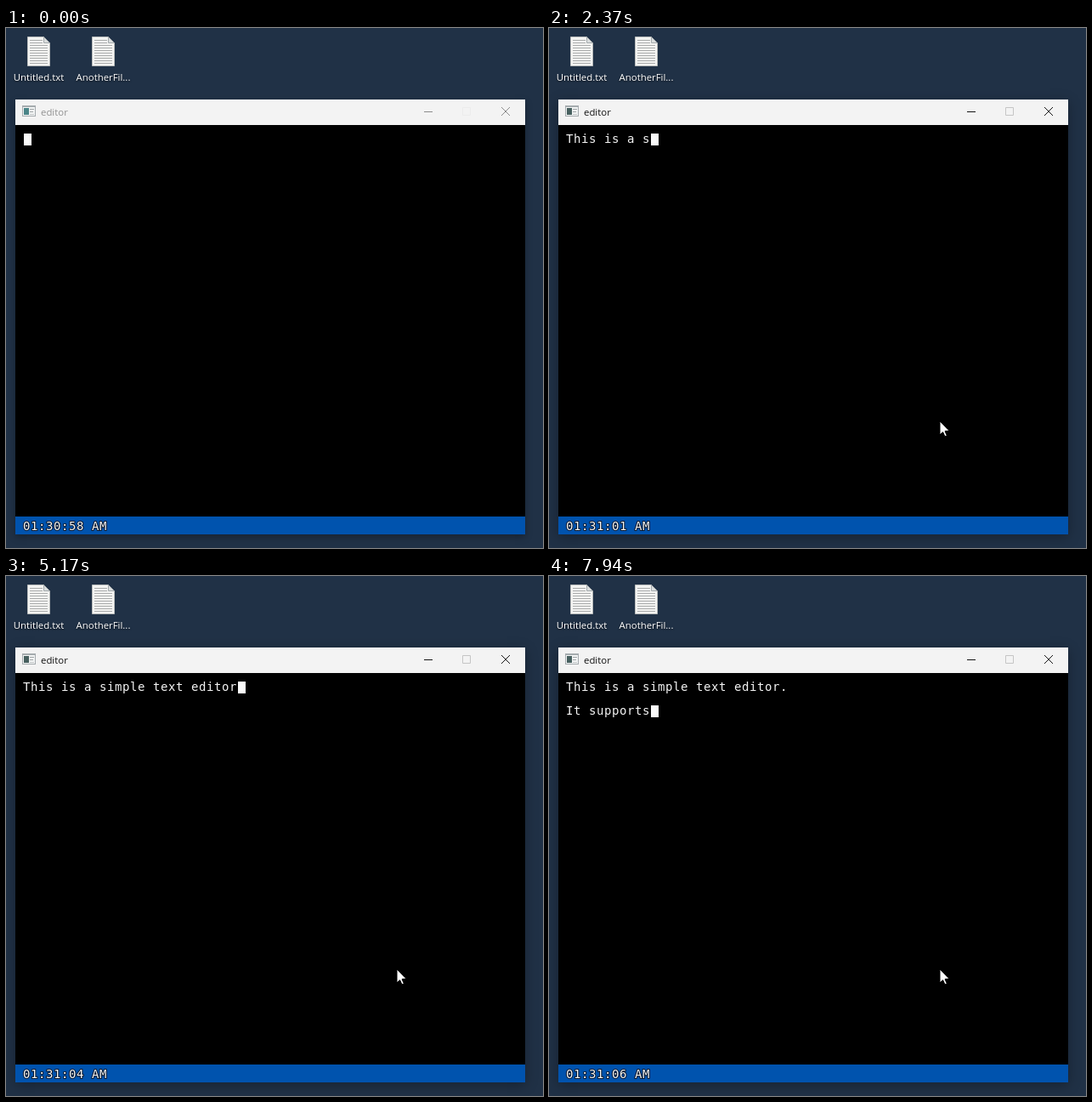
An HTML page with a canvas that plays this animation: 632x611 px, repeating every 8 s.

```html
<!DOCTYPE html>
<html lang="en">
<head>
<meta charset="utf-8">
<title>Text editor demo</title>
<style>
  html, body { margin: 0; width: 100%; height: 100%; overflow: hidden; background: #203146; }
  canvas { display: block; width: 632px; height: 611px; }
</style>
</head>
<body>
<canvas id="stage" width="632" height="611"></canvas>
<script>
const ctx = document.getElementById('stage').getContext('2d');

const LOOP = 8000;
const FOCUS_AT = 1030;
const CELL = 9, LINE = 14;
const WIN = { x: 11, y: 84, w: 600, h: 511 };
const UI_FONT = '"Open Sans", "Noto Sans", sans-serif';
const MONO_FONT = '14px "DejaVu Sans Mono", monospace';

const TEXT = 'This is a simple text editor.\n\nIt supports';
// One time per typed character, line breaks included.
const KEY_TIMES = [
  1230, 1380, 1430, 1580, 1720, 1840, 1980, 2040, 2170, 2310, 2370,
  2570, 2710, 2770, 2910, 2970, 3170, 3300,
  3430, 3560, 3760, 3900, 4100, 4230, 4290,
  4350, 4490, 4550, 5900, 6100, 6160,
  6690, 6750, 6950, 7010, 7150, 7350, 7490, 7550, 7740, 7880, 7940
];
const TICK_TIMES = [200, 1230, 2170, 3170, 4230, 5170, 6550, 7290];
const POINTER_TIMES = [70, 140, 200, 300, 370, 440];

const countPassed = (times, t) => times.filter(at => at <= t).length;

function rect(x, y, w, h, color) {
  ctx.fillStyle = color;
  ctx.fillRect(x, y, w, h);
}

function polygon(points, fill, stroke) {
  ctx.beginPath();
  points.forEach(([x, y]) => ctx.lineTo(x, y));
  ctx.closePath();
  if (fill) { ctx.fillStyle = fill; ctx.fill(); }
  if (stroke) { ctx.strokeStyle = stroke; ctx.lineWidth = 1; ctx.stroke(); }
}

function label(text, x, y, color, align = 'left') {
  ctx.font = '11.4px ' + UI_FONT;
  ctx.textAlign = align;
  ctx.fillStyle = color;
  ctx.fillText(text, x, y);
}

// Monospaced text set on the cell grid.
function cells(text, x, y, outline) {
  ctx.font = MONO_FONT;
  ctx.textAlign = 'left';
  ctx.lineJoin = 'round';
  [...text].forEach((ch, i) => {
    if (outline) {
      ctx.strokeStyle = '#06162c';
      ctx.lineWidth = 2;
      ctx.strokeText(ch, x + i * CELL, y);
    }
    ctx.fillStyle = '#f4f4f4';
    ctx.fillText(ch, x + i * CELL, y);
  });
}

function fileIcon(x, y, name) {
  polygon([[x + .5, y + .5], [x + 19.5, y + .5], [x + 26.5, y + 7.5],
    [x + 26.5, y + 34.5], [x + .5, y + 34.5]], '#f4f4f2', '#b9bcbc');
  for (let i = 0; i < 10; i++) {
    rect(x + 3, y + 4 + i * 3, i < 2 ? 15 : 21, 1, '#a9abab');
  }
  polygon([[x + 19.5, y + .5], [x + 19.5, y + 7.5], [x + 26.5, y + 7.5]], '#dadddd', '#a3a9ac');
  ctx.shadowColor = 'rgba(0,0,0,.75)';
  ctx.shadowBlur = 2;
  ctx.shadowOffsetY = 1;
  label(name, x + 13.5, y + 52, '#fff', 'center');
  ctx.shadowColor = 'transparent';
}

function desktop() {
  rect(0, 0, 632, 611, '#203146');
  fileIcon(25, 10, 'Untitled.txt');
  fileIcon(101, 10, 'AnotherFil...');
}

function titleBar(active) {
  rect(WIN.x, WIN.y, WIN.w, 30, '#f3f3f3');

  rect(19, 91, 16, 13, '#a5abae');
  rect(20, 93, 14, 10, '#f2f4f4');
  rect(21, 94, 6, 8, active ? '#47605f' : '#4b8588');
  rect(28, 95, 5, 1, '#a0a5a7');
  rect(28, 98, 4, 1, '#a0a5a7');
  rect(28, 101, 5, 1, '#c3c6c8');

  label('editor', 41, 103, active ? '#111' : '#929292');
  const ink = active ? '#151515' : '#8c8c8c';
  rect(492, 98, 10, 1, ink);
  ctx.lineWidth = 1;
  ctx.strokeStyle = active ? '#c5c5c5' : '#ececec';
  ctx.strokeRect(537.5, 93.5, 9, 9);
  ctx.strokeStyle = ink;
  ctx.beginPath();
  ctx.moveTo(583, 93); ctx.lineTo(593, 103);
  ctx.moveTo(593, 93); ctx.lineTo(583, 103);
  ctx.stroke();
}

function editorWindow(t) {
  const active = t >= FOCUS_AT;
  ctx.shadowColor = 'rgba(0,0,0,.3)';
  ctx.shadowBlur = active ? 14 : 8;
  ctx.shadowOffsetY = 3;
  rect(WIN.x, WIN.y, WIN.w, WIN.h, '#000');
  ctx.shadowColor = 'transparent';

  titleBar(active);

  const lines = TEXT.slice(0, countPassed(KEY_TIMES, t)).split('\n');
  lines.forEach((line, i) => cells(line, 20, 135 + i * LINE));
  const row = lines.length - 1;
  rect(21 + lines[row].length * CELL, 124 + row * LINE, 9, 14, '#fafafa');

  rect(WIN.x, 574, WIN.w, 21, '#0053ae');
  cells(clockText(t), 20, 590, true);
}

function clockText(t) {
  const total = 30 * 60 + 58 + countPassed(TICK_TIMES, t);
  const pad = n => String(n).padStart(2, '0');
  return `01:${pad(Math.floor(total / 60))}:${pad(total % 60)} AM`;
}

function pointer(t) {
  const step = countPassed(POINTER_TIMES, t);
  if (!step) return;
  const left = Math.pow(1 - step / POINTER_TIMES.length, 1.6);
  const x = 460 + 130 * left, y = 462 + 185 * left;
  const shape = [[0, 0], [0, 16], [3.6, 12.8], [6, 18], [8.4, 17], [6, 11.8], [11, 11.3]];
  polygon(shape.map(([dx, dy]) => [x + dx, y + dy]), '#fff', '#000');
}

function draw(now) {
  const t = now % LOOP;
  desktop();
  editorWindow(t);
  pointer(t);
}

let start;
function tick(now) {
  start ??= now;
  draw(now - start);
  requestAnimationFrame(tick);
}
draw(0);
requestAnimationFrame(tick);
</script>
</body>
</html>
```
